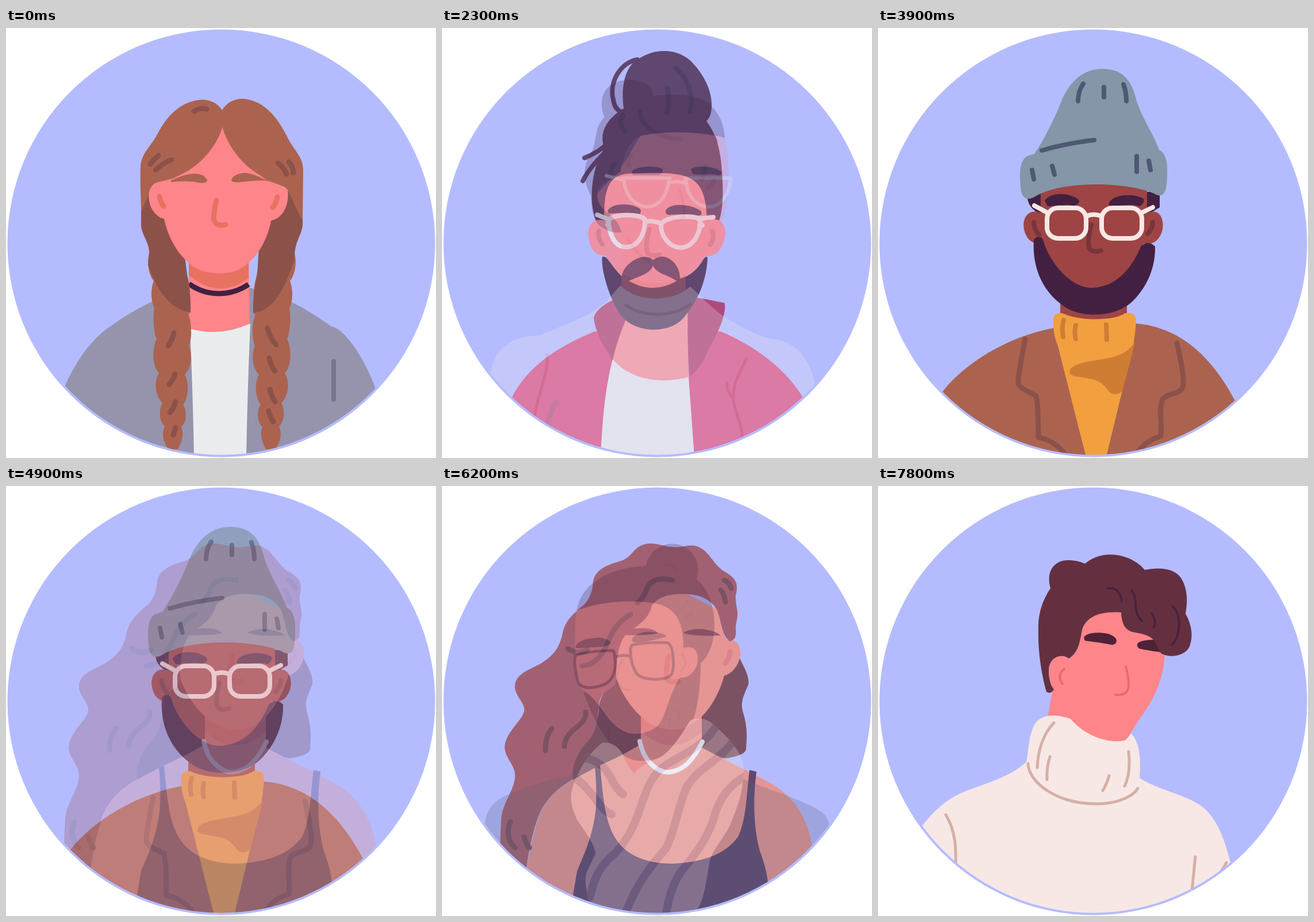
Animation, 748 px wide and 748 px high, one loop 8000 ms. Source, as an HTML page:

```html
<!DOCTYPE html>
<html lang="en">
<head>
<meta charset="utf-8">
<title>Portraits</title>
<style>
html, body { margin: 0; width: 100%; height: 100%; overflow: hidden; background: #fff; }
svg { display: block; width: 100%; height: 100%; }
.who { animation: show 8s step-end infinite; animation-delay: calc(var(--i) * 1.3s - 8s); }
.who.first { animation: first 8s step-end infinite; }
.who.last { animation: last 8s step-end infinite; }
@keyframes show {
  0% { opacity: 1; } 12.5% { opacity: .75; } 13.75% { opacity: .5; } 15% { opacity: .25; }
  16.25% { opacity: 0; } 96.25% { opacity: .25; } 97.5% { opacity: .5; } 98.75% { opacity: .75; }
  100% { opacity: 1; }
}
@keyframes first {
  0% { opacity: 1; } 12.5% { opacity: .75; } 13.75% { opacity: .5; } 15% { opacity: .25; }
  16.25%, 100% { opacity: 0; }
}
@keyframes last {
  0% { opacity: 0; } 93.75% { opacity: .25; } 95% { opacity: .5; } 96.25% { opacity: .75; }
  97.5%, 100% { opacity: 1; }
}
.line { fill: none; stroke-linecap: round; stroke-linejoin: round; stroke-width: 9; }
.mid { stroke-width: 8; }
.thin { stroke-width: 5; }
.fine { stroke-width: 4; }
.skin { fill: #fe858a; }
.dark { fill: #432041; }
.cream { fill: #f7e8e6; }
.shade { fill: #e87262; }
.blush { stroke: #e87262; }
.rose { stroke: #e26c72; }
.wool { stroke: #d5b0a5; }
.frame { stroke: #f7e8e6; }
.ink { stroke: #2f1835; }
.brown { fill: #ab6350; }
.umber { fill: #8c524a; }
.umberline { stroke: #8c524a; }
</style>
</head>
<body>
<svg viewBox="0 0 748 748">
<defs>
  <clipPath id="disc"><circle cx="374.5" cy="374.5" r="368"/></clipPath>
  <path id="scarf" d="M278,447C298,444 312,458 318,475C325,490 330,495 335,500C345,485 365,480 380,472C405,455 420,425 432,408C445,400 465,405 478,420C500,440 520,460 525,488C525,520 520,545 505,580C495,610 470,630 465,655C460,690 455,720 445,735L420,746H262C250,705 245,680 255,665L267,640C265,620 250,605 235,580C220,550 222,530 235,505C245,480 262,460 278,447Z"/>
  <clipPath id="scarfClip"><use href="#scarf"/></clipPath>
  <path id="braid" d="M276,333L248,290L235,315V340C236,362 250,372 249,392C244,412 250,432 257,440C251,455 252,475 258,487C255,505 257,530 262,541C253,560 255,590 266,600C257,615 259,640 272,652C265,665 267,685 276,693C269,708 276,726 284,733H299C306,720 310,705 305,694C315,685 315,665 308,655C319,640 318,615 311,603C324,590 324,565 318,553C324,540 323,515 318,500C322,480 321,450 316,435C313,420 311,410 311,397C295,380 283,355 276,333Z"/>
  <path id="lock" d="M376,143C366,128 352,124 337,125C298,129 276,160 262,187C252,206 235,218 234,242C233,270 235,300 235,320L248,290C250,279 254,272 262,269L290,262L312,251C342,235 370,200 376.5,171Z"/>
</defs>

<circle cx="374.5" cy="374.5" r="372" fill="#b4bcff"/>

<g clip-path="url(#disc)">

<!-- braids -->
<g class="who first">
  <path fill="#9594ac" d="M98,634C118,582 150,540 180,520C205,502 230,487 258,474L320,480L426,452L497,477C520,488 540,501 560,515C565,520 570,519 578,524C605,545 630,590 646,636V746H98Z"/>
  <path class="skin" d="M318,390V523Q372,538 424,514L422,390Z"/>
  <path class="shade" d="M318,390V430Q370,474 422,435V390Z"/>
  <path fill="#ebecee" d="M320,523Q372,538 425,514Q420,630 418,746H327Q325,630 320,523Z"/>
  <path class="line" stroke="#432041" style="stroke-linecap:butt" d="M318,445Q342,462 370,462Q398,462 422,446"/>
  <use href="#braid" class="brown"/>
  <use href="#braid" class="brown" transform="translate(751) scale(-1 1)"/>
  <path class="umber" d="M250,285L235,315V342C236,362 250,372 249,392L247,412C262,455 285,490 321,495C322,470 318,440 315,430L311,397L276,333Z"/>
  <path class="umber" d="M488,277C500,300 508,320 516,334V342C514,362 501,372 502,402C485,455 465,492 430,496C429,470 434,445 437,430L440,380L462,333Z"/>
  <path class="skin" d="M258,270C246,277 246,301 254,315C260,325 267,330 275,332C283,370 305,405 335,420C358,430 390,428 405,420C435,404 455,370 461,335C485,330 493,303 490,281L460,262L376,165L290,262Z"/>
  <use href="#lock" class="brown"/>
  <path class="brown" d="M376,143C384,129 397,123 412,123C452,126 474,160 488,187C500,213 516,222 517,246L516,334C505,315 497,297 490,280Q482,274 456,266L434,251C408,235 383,200 376,171Z"/>
  <g class="line blush"><path d="M267,293Q269,303 274,310M472,294Q470,305 464,312M366,300Q360,325 362,335Q366,346 382,342"/></g>
  <path class="brown" d="M287,265C310,255 322,252 335,254C345,256 350,262 350,266C347,271 340,270 330,268C315,266 300,267 287,268ZM392,265C394,257 404,252 418,252C432,254 445,262 458,266C440,264 425,266 410,268C398,269 393,268 392,265Z"/>
  <path class="line umberline" d="M327,145Q338,138 349,141M251,237Q257,228 265,222M260,247Q272,236 288,229M473,235Q483,242 488,254M492,233Q499,240 500,252M292,530Q290,542 282,553M294,602Q291,612 284,620M295,650Q293,660 285,669M295,695L291,708M455,522Q459,540 470,551M458,574Q460,587 468,597M459,628Q461,640 468,650M457,666Q459,676 465,685"/>
  <path class="line mid" stroke="#76758e" d="M570,580V646"/>
</g>

<!-- topknot -->
<g class="who" style="--i:1">
  <path fill="#dd3469" d="M118,650C145,590 200,555 265,528L485,528C550,555 605,600 632,650V746H118Z"/>
  <path class="skin" d="M310,470L297,578C320,605 370,625 430,607V470Z"/>
  <path fill="#ebecee" d="M297,576C320,605 370,623 429,607L439,746H276C279,680 284,625 297,576Z"/>
  <path fill="#ae2454" d="M318,467C295,470 265,490 264,505C268,535 285,560 297,578C303,550 312,525 325,495ZM428,472C440,465 470,475 491,478C497,490 480,535 465,555C455,585 440,600 430,607Q426,540 428,472Z"/>
  <path class="line" stroke="#b03a60" d="M198,652Q188,668 184,690"/>
  <path class="dark" d="M316,140C310,95 322,65 340,55C370,35 405,35 430,55C455,78 470,110 469,135C469,150 465,157 460,162C478,185 485,215 487,250C490,290 488,318 482,335H268C258,310 258,275 268,240L282,208C272,180 290,155 316,140Z"/>
  <path class="line mid" stroke="#432041" d="M340,55C310,60 290,95 298,125Q300,140 310,145M248,226Q275,215 288,200M245,266Q255,245 282,218"/>
  <path class="line thin" stroke="#432041" d="M466,180Q485,200 470,216"/>
  <path class="line mid ink" d="M407,70Q440,100 432,145M392,105Q398,130 391,147M344,145C345,165 365,190 416,193M315,152Q305,165 318,180M301,236Q290,250 294,262M328,221Q321,230 324,238M458,240Q456,255 452,262M473,266Q470,274 463,278"/>
  <path class="skin" d="M282,335C281,270 295,254 330,253C370,252 400,251 420,257C452,266 459,290 461,335C485,326 497,345 492,365C487,387 475,398 460,397C450,430 430,450 400,470H330C305,450 290,420 285,396C268,397 258,385 255,365C252,345 262,329 282,335Z"/>
  <path class="dark" d="M279,398C288,395 292,412 313,432C314,415 337,398 352,398Q364,398 367,404C375,396 385,396 395,401C408,409 414,422 414,436C432,432 446,418 455,402Q460,395 462,400C460,440 445,475 422,502C400,532 340,532 315,504C290,475 275,412 279,398Z"/>
  <path class="skin" d="M325,440C345,431 363,427 367,413C373,428 395,430 408,440C395,448 380,452 365,452C350,452 338,447 325,440Z"/>
  <path class="line mid rose" d="M273,353Q270,365 279,376M470,353Q475,365 466,377M361,350Q352,380 358,392Q366,399 378,394"/>
  <path class="dark" d="M288,318C295,304 330,303 345,315Q348,323 340,325C325,320 305,322 290,323ZM389,318C395,304 430,305 450,318Q455,325 445,327C430,322 410,325 395,325Q388,324 389,318Z"/>
  <path class="line mid frame" d="M289,334C302,323 340,323 352,332C356,345 347,382 318,381C298,380 291,355 289,334ZM381,342C388,326 440,326 449,332C452,350 440,382 414,382C390,380 380,355 381,342ZM353,337Q366,334 381,340M270,325L290,333L288,342M446,332L472,329M448,343H453"/>
</g>

<!-- side bun -->
<g class="who" style="--i:2">
  <path class="skin" d="M345,188C380,178 440,178 491,188C499,220 501,262 496,300C490,345 470,380 455,396C442,414 432,422 424,427V480H312V340C285,335 265,310 270,288L310,245Z"/>
  <path class="shade" d="M312,425C350,452 395,448 424,427V480H312Z"/>
  <path class="cream" d="M310,448C295,465 285,480 265,492C230,512 190,525 170,535C130,535 100,550 88,585L78,620V746H660L648,618C640,570 610,543 570,540C550,535 530,525 500,508C470,490 450,465 432,450C400,478 340,478 310,448Z"/>
  <path class="dark" d="M283,155C270,130 280,95 315,91C345,86 367,100 368,118C420,113 445,117 465,132C482,148 490,165 492,191C440,178 375,180 345,188C320,200 316,228 310,250C292,266 270,270 270,292C272,322 305,322 312,355C300,357 288,354 277,346C262,336 260,312 259,292C244,262 244,240 262,212C270,190 266,170 283,155Z"/>
  <path class="dark" d="M330,250C335,240 375,238 384,246Q385,254 375,256C355,255 340,256 332,256ZM433,246C440,238 475,240 486,250Q487,256 480,256C465,253 445,256 436,254Z"/>
  <path class="line thin rose" d="M413,280Q425,318 420,330Q412,336 402,333M322,365Q335,390 360,407"/>
  <path class="line frame" style="stroke-width:6" d="M286,257L314,264M314,261H397M422,261H502M316,262C318,295 340,311 358,311C380,310 392,290 395,262M424,262C426,295 445,311 465,311C485,310 500,290 502,262M397,269Q410,265 422,270"/>
  <path class="line thin wool" d="M320,482C350,504 400,503 432,481M183,568C186,600 165,640 162,672M529,575C520,600 505,615 507,645C508,670 522,685 522,712M496,617Q495,632 505,642"/>
</g>

<!-- knit cap -->
<g class="who" style="--i:3">
  <path class="brown" d="M100,650C140,585 230,535 306,522L449,514C520,520 580,565 627,660V746H100Z"/>
  <path class="line umberline" d="M256,541C250,575 243,605 244,618C248,630 265,632 275,640C280,660 278,695 279,712C295,715 315,725 325,742M520,548C526,575 534,610 530,625C525,638 500,635 494,648C488,670 495,690 492,710C475,715 460,725 450,740"/>
  <path fill="#9e4444" d="M317,460V515H433V460Z"/>
  <path fill="#f29f3f" d="M305,505Q306,495 320,496C350,510 410,510 430,496Q447,493 449,508C447,545 440,575 430,610L397,746H362C345,680 325,600 312,550C305,535 304,515 305,505Z"/>
  <path fill="#d07d34" d="M333,598C335,580 380,580 410,572C435,565 445,550 447,545C440,580 430,610 425,632C415,640 405,638 400,630C385,610 375,612 350,607C340,606 333,603 333,598Z"/>
  <path class="line mid" stroke="#d07d34" d="M323,508Q319,520 322,537M344,517Q341,530 344,541M397,516L398,542"/>
  <path class="dark" d="M260,285H490V312L470,324H283Q262,314 260,296Z"/>
  <path fill="#9e4444" d="M283,270H468V322C488,312 498,330 495,350C490,372 475,378 462,375C450,420 410,460 373,460C330,460 295,415 285,375C268,376 258,368 254,350C250,330 262,314 283,321Z"/>
  <path class="dark" d="M271,368Q280,358 287,368C295,400 330,452 373,452C420,450 445,410 457,380Q470,368 482,380C483,420 465,455 440,478C410,505 345,505 318,480C285,455 268,415 271,368Z"/>
  <path fill="#8596a8" d="M262,222L272,219C292,190 310,150 320,125C335,90 360,71 390,71C425,71 440,90 448,120C455,150 480,185 489,212C500,217 504,232 503,252C503,280 500,296 484,290C465,279 420,272 380,272C340,272 300,278 275,292C262,301 252,298 249,284C245,255 246,227 262,222Z"/>
  <path class="line mid" stroke="#4d5872" d="M357,97Q348,110 348,127M393,103V120M427,98Q432,112 432,127M285,213Q330,200 376,195M268,247L271,263M303,240L307,255M450,223V250M471,231L474,247"/>
  <path class="dark" d="M290,300C300,285 335,285 350,300Q350,308 340,309C325,305 310,310 295,310ZM402,305C405,292 440,285 462,297Q464,305 455,310C440,305 420,310 410,310Q400,310 402,305Z"/>
  <path class="line mid" stroke="#7b343b" d="M371,342Q364,370 367,382Q372,392 388,387M271,338Q271,350 280,360M478,338Q478,348 469,358"/>
  <g class="line mid frame">
    <rect x="294" y="313" width="68" height="53" rx="19"/>
    <rect x="389" y="313" width="70" height="53" rx="19"/>
    <path d="M363,327Q375,322 388,327M272,309L296,322M457,322L478,312"/>
  </g>
</g>

<!-- wavy hair -->
<g class="who" style="--i:4">
  <path fill="#682f30" d="M305,325C285,355 275,365 273,385C275,410 250,440 235,465C226,480 224,495 228,512L350,460V380ZM517,298C525,315 535,330 533,345C525,365 518,375 524,395C532,420 530,440 529,458C527,468 505,472 492,474L440,460V390L490,320Z"/>
  <path fill="#f58871" d="M145,680C155,620 165,570 185,545C205,520 240,505 270,488C300,475 325,462 346,449V390H452V455C490,475 520,490 548,505C580,520 605,535 625,570C635,588 640,605 645,630V746H145Z"/>
  <path class="shade" d="M346,390V426Q399,476 452,427V390Z"/>
  <path fill="#f58871" d="M303,335C298,300 302,275 320,250L365,195L420,185L480,215C488,250 490,270 500,268C515,267 520,282 519,295C515,315 503,327 491,330C480,370 450,424 400,424C355,423 320,380 303,335Z"/>
  <path fill="#9c4343" d="M310,253C335,247 352,246 363,249C371,251 375,254 375,256C365,260 340,259 310,260ZM420,255C430,249 445,248 455,249C470,252 482,255 484,260C465,261 430,261 420,255Z"/>
  <path fill="#9c4343" d="M500,270C510,268 512,262 511,250C510,240 515,230 514,220C513,210 510,200 511,190C516,170 512,160 490,148C470,135 465,110 440,104C425,102 415,108 400,106C385,105 375,99 360,100C330,104 335,122 312,130C285,138 268,145 263,165C262,185 255,200 245,208C225,225 215,235 210,255C205,280 195,295 170,310C145,322 125,330 127,352C130,370 148,380 142,395C135,412 110,430 109,455C110,475 128,485 127,505C126,530 105,550 103,580C102,600 100,625 103,640L146,675C150,630 162,585 172,565C187,535 212,520 228,510C224,490 235,465 250,448C270,430 270,405 273,385C272,365 285,357 296,350C303,345 303,338 303,333C303,290 310,270 320,258C345,240 360,230 365,208C375,195 390,187 420,188C450,188 468,198 478,215C487,235 485,258 500,270Z"/>
  <path class="line" stroke="#682f30" d="M401,164C375,158 360,165 355,182Q350,195 340,203M328,223C295,245 295,260 285,280C275,300 262,312 244,313M219,283C230,290 240,292 253,285M250,393C252,420 215,420 213,453M191,422Q180,435 180,460M119,584C112,600 115,620 127,629M143,610Q145,622 152,629M491,164Q500,168 503,178M485,181Q492,190 493,202"/>
  <path class="line blush" d="M501,288Q500,300 493,308M394,296C390,320 389,330 392,337Q400,343 411,340"/>
  <path class="dark" d="M266,489L275,486C280,540 283,580 300,610C320,645 360,657 400,657C445,655 490,645 515,610C530,580 530,530 535,494L547,497C540,550 543,600 553,635C560,655 564,665 568,695V746H222L235,670C245,645 265,605 268,555Q269,515 266,489Z"/>
  <path class="line mid" stroke="#fff" d="M344,444C352,485 380,498 393,498C425,495 440,470 453,445"/>
</g>

<!-- scarf -->
<g class="who" style="--i:5">
  <path fill="#5d6379" d="M75,590C75,565 90,545 120,535C160,518 200,507 240,498L525,510C560,525 610,540 645,558C665,568 673,575 674,595V746H75Z"/>
  <path class="skin" d="M305,460L335,510L375,465Z"/>
  <circle class="dark" cx="400" cy="146" r="45.500"/>
  <path class="dark" d="M234,217C242,170 290,142 355,139L443,163C465,180 474,210 474,245C473,272 465,295 450,308C450,345 445,385 436,410C420,455 380,480 345,478C300,478 262,410 246,357L300,300Z"/>
  <path class="skin" d="M234,217C280,198 340,198 375,205C415,215 420,250 420,282C440,276 448,290 444,308C440,325 430,333 413,334C400,355 392,385 382,408C370,430 340,433 325,430C295,420 285,395 265,372Q255,360 246,357L238,340C230,300 230,240 234,217Z"/>
  <path class="line fine rose" d="M418,293Q430,308 416,322M314,303C305,320 303,335 306,342Q312,355 327,355"/>
  <path class="dark" d="M232,281C235,268 255,264 275,264Q292,266 293,273C290,281 270,280 255,281C245,282 238,283 232,281ZM330,268C335,255 355,252 370,254C382,256 388,258 391,262C375,266 355,272 340,272Q331,273 330,268Z"/>
  <path class="line thin" stroke="#432041" d="M232,295C250,288 285,286 298,286Q303,300 301,318C297,340 285,349 255,351Q240,350 236,340C231,320 229,305 232,295ZM333,276C350,273 380,271 393,273Q401,278 402,300C404,325 400,333 385,335C370,338 350,336 340,328C330,315 327,295 328,283Q329,277 333,276ZM302,297Q315,293 327,296"/>
  <path class="line fine ink" d="M389,137Q400,135 408,147M427,199Q423,210 411,216M435,220Q430,228 421,231M409,390Q413,395 411,404M396,405Q398,412 396,420M291,424Q288,432 291,440"/>
  <use href="#scarf" class="cream"/>
  <g clip-path="url(#scarfClip)">
    <path class="line" stroke="#9594ac" style="stroke-width:14" d="M250,473C275,480 285,490 295,510Q305,530 315,536M228,506C245,515 260,535 275,555Q285,568 295,571M478,416C455,455 420,465 390,485C365,500 355,530 345,560C335,590 320,620 300,640C275,660 265,680 257,716M506,445C480,480 445,490 425,525C410,560 405,600 390,630C360,665 340,690 318,745M530,503C500,520 485,540 475,570C465,610 440,640 425,660C405,680 395,710 389,748"/>
  </g>
</g>

<!-- turtleneck -->
<g class="who last">
  <path class="skin" d="M430,215C390,212 355,222 350,262C348,285 340,298 332,300C318,290 298,298 297,320C297,340 303,350 303,358L294,410L400,460L432,441C440,430 448,415 460,398C482,368 499,330 499,285Z"/>
  <path fill="#4f2237" d="M358,264C362,254 385,254 400,257C412,261 417,266 414,273Q410,278 400,275C385,272 365,270 360,269ZM451,275C455,268 470,268 482,267L500,290C480,288 465,285 455,283Q450,280 451,275Z"/>
  <path fill="#643040" d="M300,178C292,150 305,130 330,129C345,129 355,133 360,135C380,119 400,118 415,120C440,124 455,135 464,146C490,141 515,143 527,160C540,180 538,205 535,222C545,240 549,260 542,279C533,298 505,299 492,291L480,268C468,256 452,257 440,253C428,248 424,238 423,220C385,217 362,228 355,250C352,265 350,290 332,300C318,290 298,298 297,320C297,340 302,348 306,354Q300,363 293,358C285,330 278,290 279,250C278,225 285,200 300,178Z"/>
  <path class="line fine" stroke="#4a2240" d="M400,178Q420,175 424,201M441,181C455,200 440,215 459,235M476,221Q485,235 480,246M512,209C530,225 525,265 511,276"/>
  <path class="line fine rose" d="M431,314C438,340 438,355 430,360Q423,365 413,363M324,318Q310,330 321,344"/>
  <path class="cream" d="M70,600C100,560 125,540 160,528C200,513 230,505 258,480C262,460 262,440 268,425C275,400 300,393 335,405C360,435 400,448 428,443Q435,440 440,430C455,445 458,475 455,508C490,530 530,535 560,555C590,575 605,620 614,660V746H70Z"/>
  <path class="line thin wool" d="M306,412C288,430 278,460 277,490M299,471Q293,490 294,511M402,504Q398,518 391,530M436,462Q440,500 429,522M261,483C262,515 310,553 380,553C420,553 445,538 452,526M118,572C135,600 136,630 135,660M552,645L546,705M606,655Q602,663 597,670"/>
</g>

</g>
</svg>
</body>
</html>
```
